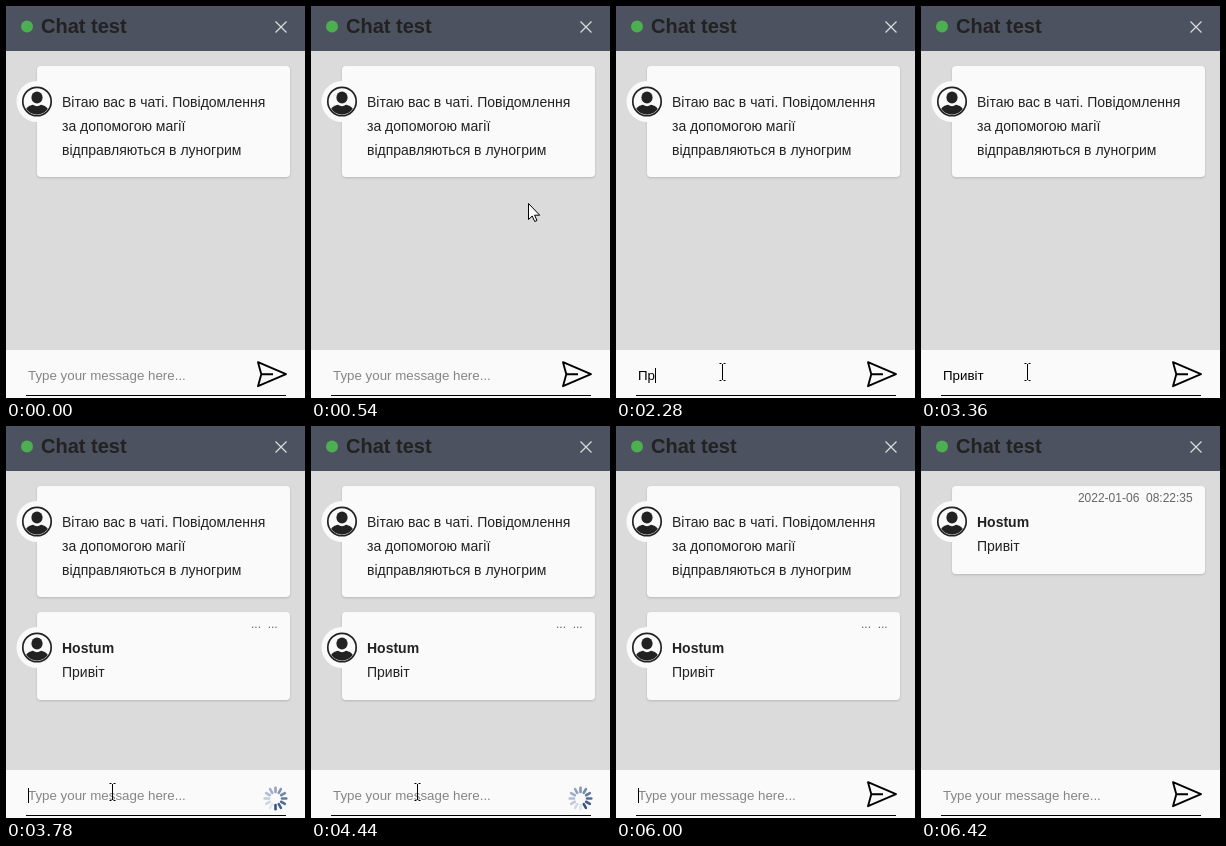
An HTML page that plays this animation: 299 by 392 pixels, repeating every 6.96 s.

```html
<!DOCTYPE html>
<html lang="uk">
<head>
<meta charset="utf-8">
<title>Chat test</title>
<style>
  html, body { margin: 0; width: 100%; height: 100%; overflow: hidden; background: #dbdbdb; }
  svg { display: block; width: 299px; height: 392px; }
  text { font-family: "Liberation Sans", Arial, sans-serif; font-size: 14px; fill: #222; white-space: pre; }
  .title { font-size: 20px; font-weight: bold; }
  .name { font-weight: bold; }
  .date { font-size: 12px; fill: #666; text-anchor: end; }
  .input { font-size: 13.333px; fill: #000; }
  .hint { fill: #868686; }
  .paper { fill: #fafafa; }
  .card { fill: #fafafa; filter: drop-shadow(0 1px 1px rgba(0, 0, 0, .16)); }
  .line { fill: none; stroke: #000; }
</style>
</head>
<body>
<svg viewBox="0 0 299 392">
  <defs>
    <clipPath id="face"><circle r="13"/></clipPath>
    <g id="avatar">
      <circle class="paper" r="20.5"/>
      <circle r="14.2" fill="none" stroke="#222" stroke-width="1.7"/>
      <g fill="#222" clip-path="url(#face)">
        <ellipse cy="-4" rx="5.6" ry="6"/>
        <path d="M-11.5 14V9C-10.5 5.2-7 4-4 3.3Q0 6 4 3.3C7 4 10.5 5.2 11.5 9V14Z"/>
      </g>
    </g>
  </defs>

  <rect width="299" height="392" fill="#dbdbdb"/>
  <rect width="299" height="45" fill="#4c525f"/>
  <circle cx="21" cy="20.5" r="6" fill="#4caf50"/>
  <text class="title" x="35" y="27">Chat test</text>
  <path d="M269.500 15.500l11 11m0-11l-11 11" fill="none" stroke="#dcdde0" stroke-width="1.200"/>

  <g id="welcome">
    <rect class="card" x="31" y="60" width="253" height="111" rx="4"/>
    <use href="#avatar" x="31" y="95.500"/>
    <text x="56" y="101">Вітаю вас в чаті. Повідомлення</text>
    <text x="56" y="125">за допомогою магії</text>
    <text x="56" y="149">відправляються в луногрим</text>
  </g>

  <g id="reply">
    <rect class="card" x="31" y="0" width="253" height="88" rx="4"/>
    <use href="#avatar" x="31" y="35.500"/>
    <text class="date" id="date" x="271.700" y="16"></text>
    <text class="name" x="56" y="41">Hostum</text>
    <text x="56" y="65">Привіт</text>
  </g>

  <rect class="paper" y="344" width="299" height="48"/>
  <text class="input hint" id="hint" x="22" y="374">Type your message here...</text>
  <text class="input" id="typed" x="22" y="374"></text>
  <rect id="caret" y="362" width="1" height="15"/>
  <rect x="20" y="389" width="260" height="1"/>

  <path id="send" class="line" stroke-width="1.900" stroke-linejoin="round"
        d="M252 356.200L280 368.200L252 380.200L255.300 368.200ZM255.300 368.200H267"/>
  <g id="spinner" transform="translate(269.500 372.500)" stroke-width="2.600" stroke-linecap="round"></g>

  <path id="arrow" d="M.5.5V16.500L4.200 13L6.700 18.500L9 17.500L6.600 12.200H11.700Z" fill="#fff" stroke="#000"/>
  <path id="beam" class="line" d="M-3-8.500H-1M1-8.500H3M0-8V8M-3 8.500H-1M1 8.500H3"/>
</svg>
<script>
const LOOP = 6960, TICK = 60, SPOKES = 12;
const WORD = "Привіт";
const KEYS = [2100, 2280, 2460, 2580, 2700, 2820];
const CLICK = 1020, SENT = 3780, DONE = 5880, STAMPED = 6180;
// visible spans of the blinking caret
const CARET = [[CLICK, 1560], [2040, 3360], [SENT, 4320], [4860, 5400], [5880, 6420]];
// pointer stops: time, x, y
const ENTER = [[360, 292, 88], [480, 240, 160], [660, 172, 270], [840, 120, 345], [900, 106, 366]];
const LEAVE = [[5100, 106, 366], [5160, 120, 346], [5220, 146, 316], [5280, 168, 290],
               [5460, 205, 252], [5700, 247, 206], [5880, 279, 164], [5940, 290, 138]];

const el = id => document.getElementById(id);
const show = (id, on) => el(id).setAttribute("visibility", on ? "visible" : "hidden");
const move = (id, x, y) => el(id).setAttribute("transform", `translate(${x} ${y})`);

const spokes = Array.from({ length: SPOKES }, (_, i) => {
  const line = document.createElementNS("http://www.w3.org/2000/svg", "line");
  line.setAttribute("y1", -6.5);
  line.setAttribute("y2", -10.8);
  line.setAttribute("transform", `rotate(${i * 360 / SPOKES})`);
  el("spinner").append(line);
  return line;
});

function along(path, t) {
  let i = 1;
  while (i < path.length - 1 && t > path[i][0]) i++;
  const [a, ax, ay] = path[i - 1], [b, bx, by] = path[i];
  const p = Math.min(1, Math.max(0, (t - a) / (b - a)));
  return [Math.round(ax + (bx - ax) * p), Math.round(ay + (by - ay) * p)];
}

function drawInput(t) {
  const count = t < SENT ? KEYS.filter(k => t >= k).length : 0;
  const typed = el("typed");
  typed.textContent = WORD.slice(0, count);
  show("hint", !count);
  const width = count ? typed.getComputedTextLength() : 0;
  el("caret").setAttribute("x", Math.floor(22 + width));
  show("caret", CARET.some(([a, b]) => t >= a && t < b));
}

function drawPointer(t) {
  const seen = t >= 360 && t < 6000;
  const inField = t >= 900 && t < 5160;
  const [x, y] = along(t < 3000 ? ENTER : LEAVE, t);
  move("arrow", x, y);
  move("beam", x + .5, y);
  show("arrow", seen && !inField);
  show("beam", seen && inField);
}

function drawSpinner(t) {
  const busy = t >= SENT && t < DONE;
  show("send", !busy);
  show("spinner", busy);
  const head = t / TICK + 3;
  spokes.forEach((line, i) => {
    const age = ((head - i) % SPOKES + SPOKES) % SPOKES / (SPOKES - 1);
    const mix = (a, b) => Math.round(a + (b - a) * age);
    line.setAttribute("stroke", `rgb(${mix(52, 224)},${mix(82, 230)},${mix(134, 238)})`);
  });
}

function draw(t) {
  const stamped = t >= STAMPED;
  show("welcome", !stamped);
  show("reply", t >= SENT);
  move("reply", 0, stamped ? 60 : 186);
  el("date").textContent = stamped ? "2022-01-06\u00a0\u00a008:22:35" : "...\u00a0\u00a0...";
  drawInput(t);
  drawPointer(t);
  drawSpinner(t);
}

const start = performance.now();
function frame() {
  const t = (performance.now() - start) % LOOP;
  draw(Math.floor(t / TICK) * TICK);
  requestAnimationFrame(frame);
}
frame();
</script>
</body>
</html>
```
